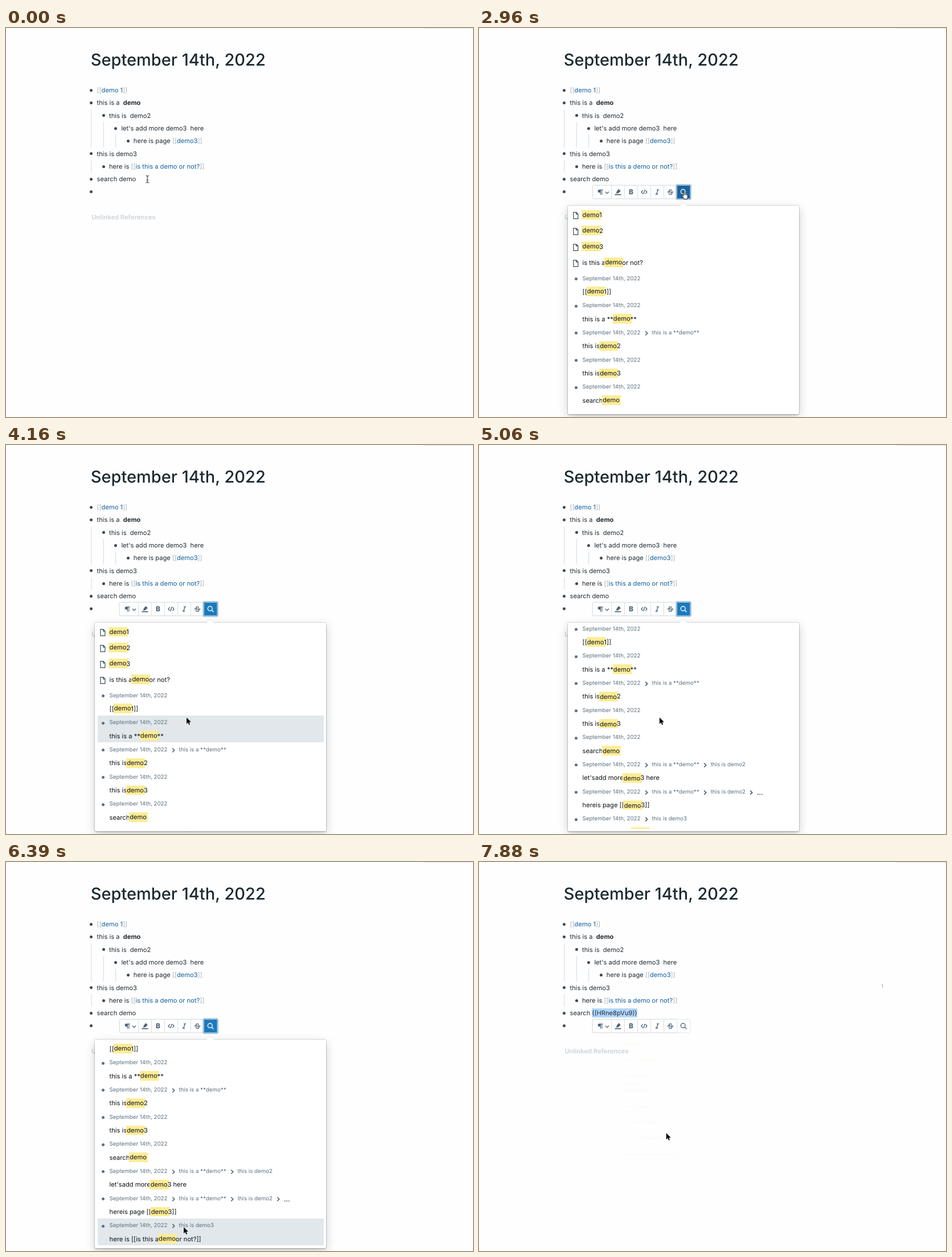
An HTML page that plays this animation: 820 px wide and 683 px high, repeating every 8000 ms.

```html
<!DOCTYPE html>
<html lang="en">
<head>
<meta charset="utf-8">
<title>Outline search</title>
<style>
html, body { margin: 0; width: 100%; height: 100%; overflow: hidden; background: #fefefe; }
body {
  position: relative; color: #202b32; white-space: pre;
  font: 11.15px/18px Inter, "Liberation Sans", sans-serif;
  text-rendering: geometricPrecision;
}
h1, h2, p { margin: 0; position: absolute; }
h1 { left: 148.8px; top: 35.5px; font-size: 29px; line-height: 40px; font-weight: 500; color: #1c2a31; }
h2 { left: 150.2px; top: 323.2px; font-size: 11.15px; font-weight: 700; color: #ced7dd; }
svg { position: absolute; left: 0; top: 0; overflow: visible; }

.row { left: calc(159.6px + var(--l) * 21.4px); top: calc(100.1px + var(--r) * 22.28px); height: 18px; }
.row::before, .block::before {
  content: ""; position: absolute; left: -12.2px; top: 6.8px;
  width: 5px; height: 5px; border-radius: 50%; background: #3e4a52;
}
.row i { font-style: normal; color: #a6afb5; }
.row a { color: #13609f; }
.row span { position: absolute; margin-top: 1px; line-height: 16px; }
.count { left: 706.5px; top: 210.3px; font-size: 8.4px; color: #87929a; }

/* popup */
.popup {
  position: absolute; left: 156px; top: 312px; width: 406px; height: 366px;
  border-radius: 2px; background: #fff; transform-origin: 203px -6px;
  box-shadow: 0 0 0 .7px rgba(16,22,26,.16), 0 1.4px 2.8px rgba(16,22,26,.2), 0 5.6px 16.7px rgba(16,22,26,.2);
}
.clip { position: absolute; left: 5px; top: 4px; width: 397px; height: 358px; overflow: hidden; }
.list { position: absolute; left: 0; top: -.4px; width: 397px; color: #0f1417; }
.hover { position: absolute; width: 397px; height: 47.7px; border-radius: 1.4px; background: #e1e7ea; }
.page, .block { position: relative; height: 27.85px; }
.block { height: 47.7px; }
.block::before { left: 6.8px; top: 10.9px; background: #5c7080; }
.text { position: absolute; left: 20.6px; top: 3.4px; }
.block .text { top: 26.9px; }
.crumbs { position: absolute; left: 20.6px; top: 4.7px; display: flex; font-size: 9.74px; color: #5c7080; }
.crumbs svg { position: static; flex: none; margin: 4px 0; }
.crumbs b { font-size: 11px; font-weight: 600; color: #202b32; }
mark { color: inherit; background: #feec95; padding: 1.4px 2.2px 1.4px 1.2px; margin: 0 -2.2px 0 -1.2px; }

/* motion: every change is a hard step */
.old, .new, .count, .bar, .btn, .glass, .ring, .popup, .list, .hover, .mouse, .beam, .hand, .arrow {
  animation: 8s step-end infinite;
}
.old { animation-name: old; }
.new, .count { animation-name: new; }
.bar { animation-name: bar; }
.btn { animation-name: btn; }
.glass { animation-name: glass; }
.ring { animation-name: ring; }
.popup { animation-name: popup; }
.list { animation-name: scroll; }
.hover { animation-name: hover; }
.mouse { animation-name: mouse; }
.beam { animation-name: beam; }
.hand { animation-name: hand; }
.arrow { animation-name: arrow; }

@keyframes old {
  0% { background: transparent; opacity: 1; }
  9.375% { background: #b3d7fe; opacity: 1; }
  33.375% { background: transparent; opacity: 1; }
  96.625%, 100% { background: transparent; opacity: 0; }
}
@keyframes new { 0% { opacity: 0; } 96.625%, 100% { opacity: 1; } }
@keyframes bar { 0% { opacity: 0; } 11.25%, 100% { opacity: 1; } }
@keyframes btn {
  0% { fill: #fff; } 24.125% { fill: #ebf1f5; } 33.375% { fill: #1b639b; }
  42.625% { fill: #1b7abb; } 98.5%, 100% { fill: #fff; }
}
@keyframes glass { 0% { stroke: #4f6475; } 33.375% { stroke: #fff; } 98.5%, 100% { stroke: #4f6475; } }
@keyframes ring { 0% { opacity: 0; } 27.75% { opacity: 1; } 98.5%, 100% { opacity: 0; } }
@keyframes popup {
  0% { opacity: 0; transform: none; }
  33.375% { opacity: .35; transform: scale(.7); }
  35.25% { opacity: 1; transform: scale(1.01); }
  37% { opacity: 1; transform: none; }
  96.625% { opacity: .6; transform: scale(.9); }
  98.5%, 100% { opacity: .03; transform: scale(.58); }
}
@keyframes scroll {
  0% { transform: none; }
  57.625% { transform: translateY(-6px); }
  59.5% { transform: translateY(-45px); }
  61.375% { transform: translateY(-90px); }
  63.25% { transform: translateY(-116.8px); }
  65% { transform: translateY(-132px); }
  66.875%, 100% { transform: translateY(-135px); }
}
@keyframes hover {
  0% { opacity: 0; top: 0; height: 27.85px; }
  44.5% { opacity: 1; top: 0; height: 27.85px; }
  46.375% { opacity: 1; top: 55.7px; height: 27.85px; }
  48.25% { opacity: 1; top: 83.5px; height: 27.85px; }
  50.125% { opacity: 1; top: 111.4px; height: 47.7px; }
  52% { opacity: 1; top: 159.1px; height: 47.7px; }
  59.5% { opacity: 0; top: 159.1px; height: 47.7px; }
  66.875% { opacity: 1; top: 254.5px; height: 47.7px; }
  74.375% { opacity: 1; top: 302.2px; height: 47.7px; }
  76.125% { opacity: 1; top: 349.9px; height: 47.7px; }
  78% { opacity: 1; top: 397.6px; height: 47.7px; }
  79.875% { opacity: 1; top: 445.3px; height: 47.7px; }
  81.75% { opacity: 1; top: 397.6px; height: 47.7px; }
  83.625% { opacity: 1; top: 349.9px; height: 47.7px; }
  85.375% { opacity: 1; top: 302.2px; height: 47.7px; }
  87.25%, 100% { opacity: 1; top: 254.5px; height: 47.7px; }
}
@keyframes mouse {
  0% { transform: translate(248.3px, 265.5px); }
  1.875% { transform: translate(243px, 265.5px); }
  3.75% { transform: translate(229px, 265.5px); }
  5.625% { transform: translate(217px, 265.5px); }
  7.5% { transform: translate(213px, 265.5px); }
  15% { transform: translate(215px, 262px); }
  16.875% { transform: translate(226px, 251px); }
  18.625% { transform: translate(247px, 246px); }
  20.5% { transform: translate(283px, 256px); }
  22.375% { transform: translate(325px, 277px); }
  24.125% { transform: translate(350px, 286px); }
  26% { transform: translate(358px, 288.5px); }
  27.75% { transform: translate(360px, 288.5px); }
  42.625% { transform: translate(359px, 304px); }
  44.5% { transform: translate(351px, 340px); }
  46.375% { transform: translate(336px, 392px); }
  48.25% { transform: translate(324px, 425px); }
  50.125% { transform: translate(318px, 466px); }
  52% { transform: translate(317px, 478.5px); }
  74.375% { transform: translate(307.5px, 556px); }
  76.125% { transform: translate(304px, 601px); }
  78% { transform: translate(307px, 634px); }
  79.875% { transform: translate(312px, 641px); }
  81.75% { transform: translate(318px, 606px); }
  83.625% { transform: translate(323px, 545px); }
  85.375% { transform: translate(325.8px, 490.5px); }
  87.25% { transform: translate(325.8px, 477.5px); }
  89.125%, 100% { transform: translate(328.8px, 476px); }
}
@keyframes beam { 0% { opacity: 1; } 22.375%, 100% { opacity: 0; } }
@keyframes hand { 0% { opacity: 0; } 22.375% { opacity: 1; } 42.625%, 100% { opacity: 0; } }
@keyframes arrow { 0% { opacity: 0; } 42.625%, 100% { opacity: 1; } }
</style>
</head>
<body>
<svg width="820" height="683" fill="none">
  <rect x="730.5" y="-12" width="110" height="12.6" rx="4" fill="#f3f5f6" stroke="#dfe3e5"/>
  <path d="M149.8 143v67M171.2 165v45M149.8 232v22" stroke="#d3dade"/>
  <path d="M192.7 187.5v22.5" stroke="#c6dbee"/>
</svg>

<h1>September 14th, 2022</h1>
<p class="row" style="--l:0;--r:0"><i>[[</i><a>demo 1</a><i>]]</i></p>
<p class="row" style="--l:0;--r:1">this is a  <b>demo</b></p>
<p class="row" style="--l:1;--r:2">this is  demo2</p>
<p class="row" style="--l:2;--r:3">let's add more demo3  here</p>
<p class="row" style="--l:3;--r:4">here is page <i>[[</i><a>demo3</a><i>]]</i></p>
<p class="row" style="--l:0;--r:5">this is demo3</p>
<p class="row" style="--l:1;--r:6">here is <i>[[</i><a>is this a demo or not?</a><i>]]</i></p>
<p class="row" style="--l:0;--r:7">search <span class="old">demo</span><span class="new" style="background:#b3d7fe">((HRne8pVu9))</span></p>
<p class="row" style="--l:0;--r:8"></p>
<p class="count">1</p>
<h2>Unlinked References</h2>

<svg class="bar" width="820" height="683" fill="none" stroke="#4f6475">
  <rect x="199.2" y="276.2" width="171.6" height="23.6" rx="2" fill="#fff" stroke="#cbd4da" stroke-width=".9"/>
  <path d="M232.5 276.5v23M255.5 276.5v23M278.5 276.5v23M301.5 276.5v23M324.5 276.5v23M347.5 276.5v23" stroke="#d8dfe4"/>
  <rect class="btn" x="347.8" y="276.5" width="22.8" height="23" stroke="none"/>
  <rect class="ring" x="346.3" y="274.9" width="25.8" height="26.2" rx="2.5" stroke="#86b3d6" stroke-width="1.4"/>
  <g stroke-width="2">
    <path transform="translate(207 282.4) scale(.697)" stroke="none" fill="#4f6475" d="M15 2v1.700h-1.500V15h-1.700V3.700h-1.800V15H8.300V9.300H6a3.650 3.650 0 0 1 0-7.300z"/>
    <path d="M222 287.5l3 3 3-3" stroke-width="1.3"/>
    <path transform="translate(238.4 282.4) scale(.697)" stroke="none" fill="#4f6475" d="M10 .5 15 5.5 9 11l-3.500.8H2.500L4.500 9.500 4.800 6.500zM0 13.500h16V16H0z"/>
    <text x="267" y="292.2" text-anchor="middle" font-size="12" font-weight="800" fill="#4f6475" stroke="none">B</text>
    <path transform="translate(284.4 282.4) scale(.697)" d="M4.500 3.500 1 8l3.500 4.500M11.500 3.500 15 8l-3.500 4.500M9.700 2.500 6.300 13.500"/>
    <path transform="translate(307.4 282.4) scale(.697)" d="M6.500 2.500h6M9.800 2.500 6.200 13.500M3.500 13.500h6"/>
    <path transform="translate(330.4 282.4) scale(.697)" d="M12 4.800C11 2 4.600 1.800 4.600 5.200c0 1.400 1.400 2.300 3 2.700M4 11c.8 3.800 8.200 3.600 8.200.2 0-1.200-.7-2.100-1.700-2.700M.5 8h15"/>
    <path class="glass" transform="translate(353.4 282.2) scale(.72)" d="M12.200 7A5.400 5.400 0 1 1 1.400 7a5.400 5.400 0 0 1 10.800 0zM10.800 10.800l4.700 4.700"/>
  </g>
</svg>

<div class="popup">
  <svg width="406" height="4" fill="#fff"><path d="M192 .6C197 .2 198-2 200-4.300q3-3.200 6 0C208-2 209 .2 214 .6" stroke="#cfd5d9" stroke-width=".7"/><path d="M190 .5h26v2h-26z"/></svg>
  <div class="clip"><div class="list"><div class="hover"></div></div></div>
</div>

<svg width="820" height="683" fill="none">
  <g class="mouse">
    <path class="beam" d="M-2.900-6.300Q0-6.300 0-4.700 0-6.300 2.900-6.300M0-4.700V4.700M-2.900 6.300Q0 6.300 0 4.700 0 6.300 2.900 6.300M-1.500 1.500h3" stroke="#1b1b1b"/>
    <path class="hand" d="M-1 1a1 1 0 0 1 2 0v3.200c.3-.8 1.900-.7 2 .3.400-.7 1.700-.5 1.800.4.500-.5 1.600-.2 1.600.8V8c0 1.500-.8 2-.9 3.800H0C-.6 9.500-2.500 8-3.300 6.500-3.600 5.600-2.400 5-1.700 5.800l.7.800z" fill="#fff" stroke="#111" stroke-width=".9"/>
    <path class="arrow" d="M0 0v11.200l2.600-2.400 1.700 4 1.900-.8-1.700-3.900H8z" fill="#000" stroke="#fff" stroke-width="1.2" paint-order="stroke"/>
  </g>
</svg>

<script>
const pages = ["|1", "|2", "|3", "is this a|or not?"];
const day = "September 14th, 2022", bold = "this is a **demo**";
const blocks = [
  ["[[|1]]"],
  ["this is a **|**"],
  ["this is|2", bold],
  ["this is|3"],
  ["search|"],
  ["let'sadd more|3 here", bold, "this is demo2"],
  ["hereis page [[|3]]", bold, "this is demo2", "<b>...</b>"],
  ["here is [[is this a|or not?]]", "this is demo3"]
];
const icon = '<svg width="10" height="13" style="left:4px;top:7.5px" fill="none" stroke="#394b59" stroke-width="1.2">' +
  '<path d="M.9.700h5l3 3v8.200h-8zM5.700.700v3.200h3.200"/></svg>';
const chevron = '<svg width="20" height="10" fill="none" stroke="#4f6475" stroke-width="1.7"><path d="M8.200 1.500l3.500 3.500-3.500 3.500"/></svg>';
const line = s => `<div class="text">${s.replace("|", "<mark>demo</mark>")}</div>`;
const page = s => `<div class="page">${icon}${line(s)}</div>`;
const block = ([s, ...path]) =>
  `<div class="block"><div class="crumbs">${[day, ...path].map(p => `<span>${p}</span>`).join(chevron)}</div>${line(s)}</div>`;
document.querySelector(".list").insertAdjacentHTML("beforeend", pages.map(page).join("") + blocks.map(block).join(""));
</script>
</body>
</html>
```
